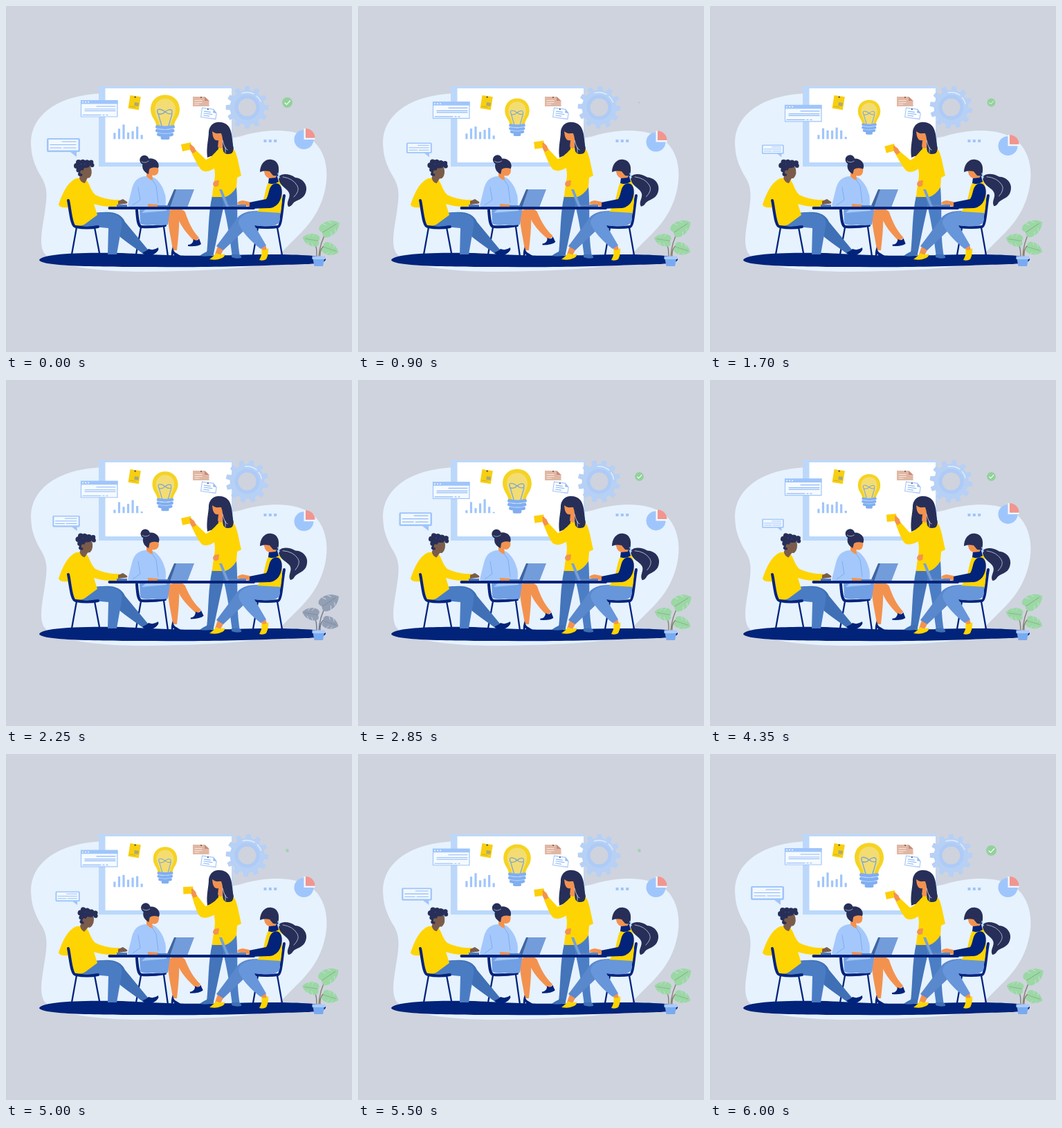
Recreate the animation shown at these times as an HTML page. Size 500 px wide and 500 px high, loop 6100 ms.

```html
<!DOCTYPE html>
<html lang="en">
<head>
<meta charset="utf-8">
<title>Team meeting</title>
<style>
  html, body { margin: 0; width: 100%; height: 100%; overflow: hidden; background: #cfd3de; }
  svg { display: block; width: 100%; height: 100%; }
  .line { fill: none; stroke-linecap: round; stroke-linejoin: round; }
  .navy { fill: #01237a; }
  .hair { fill: #272f58; }
  .yellow { fill: #fed402; }
  .skin { fill: #f3924f; }
  .brown { fill: #7b5c4b; }
  .chair { stroke: #03247c; stroke-width: 2.3; }
  .chair .back { stroke-width: 4; }
  .ink { stroke: #8fb9f8; stroke-width: 1.2; }
  #plant { --leaf: #9ad8a4; --stem: #85806f; }
  #plant.dim { --leaf: #929fb5; --stem: #6f7789; }
</style>
</head>
<body>
<svg viewBox="0 0 500 500" xmlns="http://www.w3.org/2000/svg">
  <path fill="#e6f2fe" d="M36 196C37 160 70 132 128 127C180 123 240 150 285 180C303 192 322 194 345 186.500C380 177 422 176 445 196C464 214 467 243 460 270C453 297 440 313 428 326L396 358V371C345 379 290 383 200 384C130 384 70 376 55 357C47 343 53 320 56 298C60 274 60 262 51 247C41 231 36 216 36 196Z"/>

  <!-- board -->
  <path fill="#bbd8fb" d="M134 116H328V232H134Z"/>
  <path fill="#fff" d="M143.500 119H326V226H143.500Z"/>
  <g id="bars" fill="#a0c5fb"></g>

  <g transform="rotate(9 185.500 139)">
    <path fill="#f7cf12" d="M178 130H193.500V149H178Z"/>
    <path fill="#b0a870" d="M186 139h6v5h-6Z"/>
    <path class="line" stroke="#d5b21a" d="M180 146h8"/>
    <circle cx="185.500" cy="131.500" r="1.200" fill="#4d4a3e"/>
  </g>
  <path fill="#e0b7a4" d="M270 131H287L293.500 137V145H270Z"/>
  <path fill="#c98b76" d="M287 131V137H293.500Z"/>
  <path class="line" stroke="#f8e4da" d="M273 136.500h10M273 139.500h10M273 142h6"/>
  <circle cx="282" cy="132" r="1" fill="#6a5149"/>
  <g transform="rotate(8 293 155)">
    <path fill="#fff" stroke="#a5c9fb" stroke-width="1.200" d="M282.500 148.500H299L304 153.500V162H282.500Z"/>
    <path fill="#8fb9f8" d="M299 148.500V153.500H304Z"/>
    <path class="line ink" d="M286 153h9M286 156h12M286 159h8"/>
    <circle cx="291" cy="149.500" r="1" fill="#355089"/>
  </g>

  <g id="bulb">
    <path fill="#f6d322" d="M217 173C217 165 209 161 209 149.500C209 137 218 128.500 230 128.500S251 137 251 149.500C251 161 243 165 243 173Z"/>
    <path fill="#f3dd72" d="M222 173C221 164 215 159 215 149.500C215 141 221 134 230 134S245 141 245 149.500C245 159 239 164 238 173Z"/>
    <path class="line" stroke="#7da5d6" stroke-width="1.300" d="M225 173L220 156C215 146 225 149 230 153C235 157 241 157 240 152C239 148 233 150 230 153C226 157 218 158 219 152M240 156L235 173"/>
    <path class="line" stroke="#80aef0" stroke-width="5" d="M218.500 174.500Q230 177 241.500 174.500M218.500 180Q230 183 241 180M220.500 185.500Q230 188 239.500 185.500M226 190.500H234"/>
    <path class="line" stroke="#b9d4fb" stroke-width="1" d="M218 177.500Q230 180 242 177M219 183Q230 186 241 183"/>
  </g>

  <g id="win">
    <path fill="#f5faff" stroke="#9fc5fb" stroke-width="1.200" d="M108.500 136.500H161V160H108.500Z"/>
    <path fill="#9fc5fb" d="M108 136H161.500V141.500H108Z"/>
    <path class="line" stroke="#fff" stroke-width="1.800" d="M111 138.700h.1M115 138.700h.1M119 138.700h.1"/>
    <path class="line ink" d="M131 145h27M114 149h44M114 151.500h44M111 157.500h26M140 157.500h2M145 157.500h2"/>
  </g>

  <g id="bubble">
    <path fill="#9fc5fb" d="M61 191H105Q107 191 107 193V209Q107 211 105 211H102V218L93 211H61Q59 211 59 209V193Q59 191 61 191Z"/>
    <path fill="#f1f8ff" d="M61.500 193H104.500V208.500H61.500Z"/>
    <path class="line ink" d="M81 196h20M64 200.500h37M64 205h16M83 205h18"/>
  </g>

  <g id="gear">
    <path id="cog" fill="#b6d0f6" fill-rule="evenodd"/>
    <circle cx="348.500" cy="146.500" r="15.500" fill="none" stroke="#aecbf6" stroke-width="5"/>
    <path class="line" stroke="#e1edfc" stroke-width="1.500" d="M341 126Q350 123 358 127M362 130Q366 133 368 138"/>
  </g>

  <g id="check">
    <circle cx="406.500" cy="139.500" r="7.500" fill="#92d29b"/>
    <path class="line" stroke="#fff" stroke-width="1.200" d="M403 140L405.500 142.300L410.500 137"/>
  </g>
  <path fill="#9fc5fb" d="M372.500 193h4v4h-4ZM379.800 193h4v4h-4ZM387.200 193h4v4h-4Z"/>
  <g id="pie">
    <circle cx="430.500" cy="193" r="14" fill="#9fc6fc"/>
    <path fill="none" stroke="#f3f7fd" stroke-width="2.400" d="M431.700 177V191.800H446.500"/>
    <path fill="#f2958e" d="M433 190.500V177A13.500 13.500 0 0 1 446.500 190.500Z"/>
  </g>

  <path class="navy" d="M48 367C53 357 118 356 168 357C232 360 260 362 330 360C390 358 462 359 462 366C462 373 440 373 400 374C350 376 280 378 215 377C150 377 50 377 48 367Z"/>

  <!-- plant -->
  <g id="plant">
    <g id="leaves">
      <g class="line" stroke="var(--stem)" stroke-width="1.400">
        <path d="M449 363C449 352 449 346 444 340M452 363C453 350 456 338 463 327M454 363C453 350 460 342 469 347"/>
      </g>
      <g id="leafset"></g>
    </g>
    <path fill="#79aaf0" d="M443.500 365H460L458 376H445.500Z"/>
    <path fill="#a9cbfa" d="M442.500 361.500H461V366H442.500Z"/>
  </g>

  <!-- standing woman -->
  <g>
    <path fill="#4474b9" d="M298 274H318L309 315L300 358H290C293 330 292 300 298 274Z"/>
    <path fill="#4c7ec5" d="M311 274L333 261C336 300 332 325 338 362H327C324 340 321 315 311 274Z"/>
    <path fill="#3f70b6" d="M280 361C285 357 289 356 291 354H300V360Q290 363 280 361ZM326 359H336Q341 361 340 364Q333 366 326 363Z"/>
    <path class="hair" d="M293 181C295 168 307 165 317 170C328 176 326 192 329 207Q329 213 321 217L296 217L291 219C289 203 293 193 293 181Z"/>
    <path class="yellow" d="M303 208L311 202L326 205C333 207 335 223 340 245L334 248L333 262Q326 273 317 276L298 276C299 258 304 248 301 235Z"/>
    <path class="skin" d="M298 181C299 193 302 195 307 194L306 204Q311 208 316 203L312 183Q303 186 298 181Z"/>
    <path class="hair" d="M297 180C301 169 319 169 323 180C324 193 333 207 326 213Q317 216 314 210C312 202 315 194 311 184Q304 184 297 180ZM298 188C302 194 306 198 307 207Q300 215 292 218C290 207 295 199 298 188Z"/>
    <path class="line" stroke="#e5e2ea" stroke-width=".8" d="M313 194Q316 207 320 208M317 204v8"/>
    <path class="skin" d="M308 252Q299 251 299 258Q301 263 307 260Z"/>
  </g>
  <g id="arm">
    <path class="yellow" d="M307 207C301 213 294 221 289 222L274 208L268 212C274 224 280 236 284 238C291 241 298 237 306 231Z"/>
    <path fill="#fdcf08" d="M253 200L267 197L269 207L255 210Z"/>
    <path class="skin" d="M266 204Q264 200 267 200L272 204L275 210L270 213Q265 209 266 204Z"/>
  </g>

  <!-- woman in blue -->
  <g>
    <g class="line chair"><path class="back" d="M189 295C190 309 191 319 196 319Q212 320 230 317"/><path d="M195 320L188 359M228 319L234 362"/></g>
    <path class="skin" d="M234 295H250C251 318 249 335 247 353H241C239 335 233 318 234 295Z"/>
    <path class="navy" d="M241 348Q242 356 246 357L254 362Q252 365 245 364L242 358L240 364H239Q238 355 241 348Z"/>
    <g id="shin">
      <path class="skin" d="M235 295Q254 290 259 298C264 313 269 324 279 335L273 341C262 329 251 318 246 299Z"/>
      <path class="navy" d="M271 337Q276 341 279 336L282 344Q277 348 263 347V345Q270 345 271 337Z"/>
    </g>
    <path fill="#719fe3" d="M193 294C207 289 225 289 237 294L234 316Q222 318 213 316Q198 318 194 314Z"/>
    <path fill="#a4c8fb" d="M202 246C190 247 185 253 182 264L176 288Q178 292 187 291L205 291L196 299L232 296C229 287 233 279 229 270C226 258 217 248 211 247Z"/>
    <path class="line" stroke="#7da9e8" stroke-width=".9" d="M191 262L194 280L183 288M210 249L217 260L220 284"/>
    <path class="skin" d="M205 286L219 287Q224 289 218 291H205ZM203 239L211 241L212 252Q207 251 203 246Z"/>
    <g id="bunHead">
      <path class="skin" d="M204 233H220Q222 244 214 245Q206 245 204 233Z"/>
      <circle class="hair" cx="200" cy="222.500" r="6.800"/>
      <path class="hair" d="M197 231C198 220 211 217 218 224Q222 229 220 234Q211 232 207 236L206 243Q197 239 197 231Z"/>
      <path class="line" stroke="#c7c9dc" stroke-width=".7" d="M196 225Q201 228 206 224"/>
    </g>
  </g>

  <!-- man -->
  <g>
    <path fill="#3f70b6" d="M125 300C151 295 166 298 172 312L205 352L198 358C181 345 158 332 151 317Z"/>
    <path class="navy" d="M198 356Q203 354 206 351Q213 354 220 349Q222 354 213 359Q204 362 198 358Z"/>
    <path fill="#4a7cc4" d="M101 318C109 303 127 296 148 299C165 301 169 308 167 319L160 359H147L148 321Q124 318 101 318Z"/>
    <path class="yellow" d="M102 249C89 254 82 270 76 287Q77 292 89 291L96 315Q103 320 113 316L132 302L127 286Q146 292 164 289V280C150 281 138 277 129 273C121 266 121 253 113 249Z"/>
    <g class="line chair"><path class="back" d="M90 281C93 294 94 319 101 319Q117 322 133 319"/><path d="M102 320L95 359M128 320L135 357"/></g>
    <g id="curlyHead">
      <path class="brown" d="M108 240L119 246L114 256Q108 255 106 249ZM109 232H122Q126 242 121 248Q113 251 109 242Z"/>
      <g id="curls" class="hair"></g>
      <path class="hair" d="M103 229L122 228Q123 234 113 234L111 239L110 246Q103 243 103 229Z"/>
      <circle class="brown" cx="110" cy="240" r="2.800"/>
    </g>
    <path class="brown" d="M162 282L169 279L175 283Q177 286 170 286L162 287Z"/>
  </g>

  <!-- woman with ponytail -->
  <g>
    <g class="line chair"><path class="back" d="M402 274C399 289 398 319 393 319Q377 321 360 319"/><path d="M364 320L357 360M392 320L399 360"/></g>
    <path class="skin" d="M306 347L315 351L309 362L302 359ZM368 347L375 345L378 356L372 359Z"/>
    <path class="yellow" d="M294 366Q301 361 304 357Q310 361 316 358Q317 363 310 365Q304 368 294 366ZM369 351Q373 355 379 350Q380 358 376 366Q371 369 366 367Q371 359 369 351Z"/>
    <path fill="#5a88cd" d="M366 296C348 296 338 299 331 311L304 347L314 353L350 319Z"/>
    <path fill="#6796da" d="M372 296H396V309C394 319 381 320 359 317L376 346L368 351C355 341 339 325 336 313C337 301 354 296 372 296Z"/>
    <path class="yellow" d="M379 255L392 250C401 257 400 280 397 299L363 297C374 286 373 268 379 255Z"/>
    <path class="navy" d="M380 248L392 246L394 254Q386 259 379 256ZM387 257C398 253 402 268 396 281Q392 290 382 292L351 293V284L376 279C381 271 379 261 387 257Z"/>
    <path class="skin" d="M352 283L342 281Q334 282 334 286L344 288L352 290Z"/>
    <path class="skin" d="M373 235L388 234L390 248L380 249Q372 246 373 235Z"/>
    <g id="tail">
      <path class="hair" d="M395 246C400 241 411 243 418 248C430 249 437 260 433 270C430 280 419 280 415 285Q412 290 408 290C404 283 412 277 409 270C406 263 396 261 394 250Z"/>
      <path class="line" stroke="#c9cfe4" stroke-width=".8" d="M400 247Q415 249 421 260Q425 267 416 276"/>
    </g>
    <path class="hair" d="M367 240C367 228 375 220 384 222C392 223 395 231 394 239L393 246L386 245L381 239Q373 237 367 240Z"/>
    <path class="line" stroke="#9fc5fb" stroke-width="1.600" d="M393 242L395 248"/>
  </g>

  <!-- table -->
  <path fill="#4f78b7" d="M160 287H175V291H160Z"/>
  <path fill="#739cdb" d="M244 265H272L262 291H232Z"/>
  <path fill="#41659f" d="M243 265H246L237 291H232Z"/>
  <path fill="#5b83c1" d="M219 288H235V291H219ZM321 287H347V291H321Z"/>
  <path fill="#789fda" d="M308 265H312L322 290H318Z"/>
  <path class="line" stroke="#02237a" stroke-width="4" d="M149.500 292H358"/>
</svg>
<script>
  const $ = id => document.getElementById(id);
  const LOOP = 6100, END = 6000, STEP = 50;

  // bars: height at rest, height half way through
  const bars = [[9, 4], [15, 16], [21, 7], [9.5, 14], [11.5, 20], [18, 9], [6, 1.5]];
  $('bars').innerHTML = bars.map((b, i) => `<rect x="${155.3 + i * 6.55}" width="3.2"/>`).join('');

  $('curls').innerHTML = [[102, 231, 4], [105, 226, 4], [111, 225.5, 3.8], [117, 226, 3.8],
    [123, 226, 3.4], [124.500, 230, 3], [105, 237, 3.6], [107, 243, 3]]
    .map(([x, y, r]) => `<circle cx="${x}" cy="${y}" r="${r}"/>`).join('');

  const leaf = (x, y, turn, size) => `
    <g transform="translate(${x} ${y}) rotate(${turn}) scale(${size})">
      <path fill="var(--leaf)" d="M-10 0C-16 -8 -8 -12 0 -11C10 -10 15 -4 18 1C12 9 2 13 -7 10C-13 8 -13 3 -10 0Z"/>
      <path class="line" stroke="#cfd9df" stroke-width="1" d="M-3 -11L0 -6M5 -10L8 -5M-2 11L1 6M6 9L8 5"/>
      <path class="line" stroke="var(--stem)" stroke-width=".5" d="M-10 0H13"/>
    </g>`;
  $('leafset').innerHTML = leaf(466, 322, -32, 1) + leaf(443, 338, 190, .82) + leaf(467, 351, 18, .8);

  // gear outline with twelve teeth and a round hole
  function cogPath(cx, cy) {
    const pts = [];
    for (let i = 0; i < 12; i++) {
      for (const [off, r] of [[-9, 25], [-6, 31], [6, 31], [9, 25]]) {
        const a = (i * 30 + off) * Math.PI / 180;
        pts.push((cx + r * Math.cos(a)).toFixed(1) + ' ' + (cy + r * Math.sin(a)).toFixed(1));
      }
    }
    return `M${pts.join('L')}ZM${cx - 13} ${cy}a13 13 0 1 0 26 0a13 13 0 1 0 -26 0Z`;
  }
  $('cog').setAttribute('d', cogPath(348.5, 146.5));

  // 0 -> 1 -> 0 over one period
  const wave = (t, period) => (1 - Math.cos(2 * Math.PI * t / period)) / 2;
  const triangle = (t, period) => 1 - Math.abs(1 - 2 * (t % period) / period);

  function track(keys, t) {
    let i = 1;
    while (i < keys.length - 1 && t > keys[i][0]) i++;
    const [t0, v0] = keys[i - 1], [t1, v1] = keys[i];
    return v0 + (v1 - v0) * wave(t - t0, 2 * (t1 - t0));
  }
  const armKeys = [[0, 0], [900, 4], [1700, -3], [2850, 4], [3700, 3], [5000, 9], [6000, 0]];
  const headKeys = [[0, 0], [900, 6], [1700, 3], [2850, 10], [3700, 6], [5000, 14], [6000, 0]];

  const set = (id, value) => $(id).setAttribute('transform', value);
  const spin = (id, deg, x, y) => set(id, `rotate(${deg} ${x} ${y})`);
  const drop = (id, y) => set(id, `translate(0 ${y})`);
  const grow = (id, s, x, y) => set(id, `translate(${x} ${y}) scale(${s}) translate(${-x} ${-y})`);

  function draw(t) {
    const slow = wave(t, 6000), mid = wave(t, 3000), quick = wave(t, 1500);
    const float = t < 4800 ? wave(t, 4800) : 0;
    const check = 1 - (quick + triangle(t, 1500)) / 2;

    [...$('bars').children].forEach((bar, i) => {
      const h = bars[i][0] + (bars[i][1] - bars[i][0]) * slow;
      bar.setAttribute('y', 192.3 - h);
      bar.setAttribute('height', h);
    });
    grow('bulb', 1 - .235 * mid, 230, 161);
    grow('bubble', 1 - .355 * mid, 106, 219);
    grow('check', check, 406.5, 139.5);
    drop('win', 11.4 * slow);
    drop('pie', 11.4 * float);
    spin('gear', 15 * slow, 348.5, 146.5);
    spin('arm', track(armKeys, t), 303, 215);
    spin('curlyHead', track(headKeys, t), 111, 253);
    spin('bunHead', 6 * mid, 206, 246);
    spin('shin', -5 * quick, 247, 301);
    spin('tail', -4 * float, 396, 247);
    spin('leaves', -2 * mid, 451, 363);
    $('plant').classList.toggle('dim', check < .05);
  }

  const start = performance.now();
  function tick(now) {
    const t = Math.max(0, now - start) % LOOP;
    draw(Math.min(END, Math.floor(t / STEP) * STEP));
    requestAnimationFrame(tick);
  }
  draw(0);
  requestAnimationFrame(tick);
</script>
</body>
</html>
```
